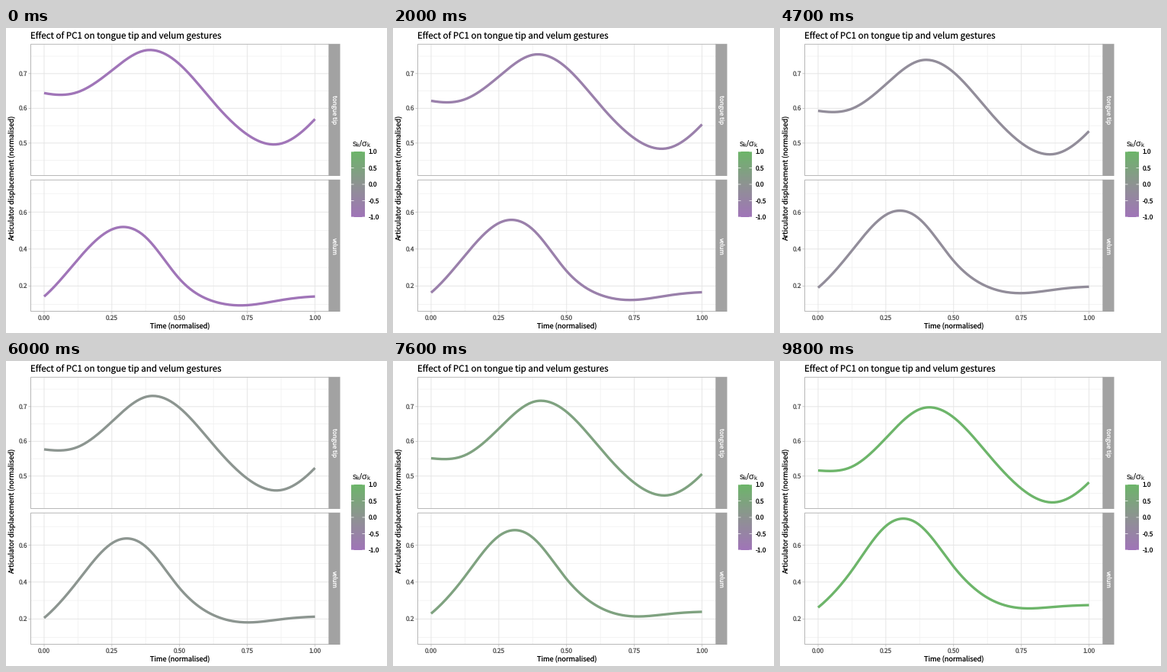
Write a matplotlib script that moves like this. It is 500 px wide and 400 px high and loops after 10 s.

```python
import numpy as np
import matplotlib.pyplot as plt
from matplotlib.animation import FuncAnimation
from matplotlib.patches import Rectangle

W, H, DPI = 500, 400, 100
PT = 72 / DPI  # points per pixel
STEP_MS, LOOP_MS = 100, 10000

plt.rcParams.update({
    "font.family": "Noto Sans CJK JP",
    "mathtext.fontset": "custom",
    "mathtext.rm": "Liberation Sans",
    "text.hinting": "none",
    "text.hinting_factor": 1,
    "path.snap": False,
})

PURPLE, MIDDLE, GREEN = (160, 117, 184), (142, 147, 146), (109, 181, 106)
STRIP, BORDER = "#a2a2a2", "#b8b8b8"
MAJOR, MINOR = "#e6e6e6", "#f1f1f1"
TICK_TEXT = "#4d4d4d"

LEFT, RIGHT, STRIP_RIGHT = 32.5, 424, 438.5
X0, X_SPAN = 50, 355.5
TIME = np.linspace(0, 1, 181)


def spline(knots, start, end):
    """Smooth curve through evenly spaced knots with given end slopes."""
    y = np.array(knots)
    n = len(y) - 1
    system = 4 * np.eye(n + 1) + np.eye(n + 1, k=1) + np.eye(n + 1, k=-1)
    system[0], system[n] = np.eye(n + 1)[[0, n]]
    inner = 3 * (y[2:] - y[:-2])
    slope = np.linalg.solve(system, [start / n, *inner, end / n])

    i = np.minimum((TIME * n).astype(int), n - 1)
    u = TIME * n - i
    rise = y[i + 1] - y[i]
    bend = (slope[i] - rise) * (1 - u) - (slope[i + 1] - rise) * u
    return y[i] + rise * u + u * (1 - u) * bend


def score_colour(score):
    stops = zip(PURPLE, MIDDLE, GREEN)
    return tuple(np.interp(score, [-1, 0, 1], s) / 255 for s in stops)


class Panel:
    """One facet: name, pixel extent, value axis and the curve at both ends."""

    def __init__(self, name, top, bottom, ref, scale, major, minor, low, high):
        self.name, self.top, self.bottom = name, top, bottom
        self.ref, self.scale = ref, scale
        self.major, self.minor = major, minor
        self.low, self.high = low, high

    def y(self, value):
        ref_value, ref_y = self.ref
        return ref_y - (value - ref_value) * self.scale

    def curve(self, score):
        return self.y(self.low + (self.high - self.low) * (score + 1) / 2)


tongue = Panel(
    "tongue tip", 21.3, 193.5, (0.7, 59.8), 455.5,
    np.arange(0.5, 0.71, 0.1), np.arange(0.45, 0.76, 0.1),
    spline([.644, .647, .709, .767, .727, .618, .5245, .4985, .569], -.15, .83),
    spline([.516, .527, .609, .6925, .669, .565, .464, .4245, .482], -.05, .78),
)
velum = Panel(
    "velum", 199.3, 371.5, (0.2, 338.3), 242.2,
    np.arange(0.2, 0.61, 0.2), np.arange(0.1, 0.71, 0.2),
    spline([.143, .344, .506, .464, .238, .117, .096, .1235, .143], 1.25, .06),
    spline([.262, .463, .703, .708, .484, .315, .2585, .266, .275], 1.2, .03),
)
panels = [tongue, velum]

fig = plt.figure(figsize=(W / DPI, H / DPI), dpi=DPI, facecolor="white")
ax = fig.add_axes([0, 0, 1, 1])
ax.axis("off")


def stroke(xs, ys, colour, width, z=1):
    return ax.plot(xs, ys, color=colour, lw=width * PT, zorder=z,
                   solid_capstyle="butt")[0]


def label(x, y, text, size, colour="black", **kw):
    kw.setdefault("va", "baseline")
    ax.text(x, y, text, fontsize=size * PT, color=colour, zorder=6, **kw)


def draw_panel(p):
    def across(value, colour, width):
        stroke([LEFT, RIGHT], [p.y(value)] * 2, colour, width)

    def down(value, colour, width):
        stroke([X0 + value * X_SPAN] * 2, [p.top, p.bottom], colour, width)

    for v in p.minor:
        across(v, MINOR, 0.8)
    for v in np.arange(0.125, 1, 0.25):
        down(v, MINOR, 0.8)
    for v in p.major:
        across(v, MAJOR, 1)
        stroke([LEFT - 3, LEFT], [p.y(v)] * 2, BORDER, 0.8)
        label(28, p.y(v) + 3, f"{v:.1f}", 8.3, TICK_TEXT, ha="right")
    for v in np.arange(0, 1.01, 0.25):
        down(v, MAJOR, 1)
    ax.add_patch(Rectangle((LEFT, p.top), RIGHT - LEFT, p.bottom - p.top,
                           fill=False, ec=BORDER, lw=PT, zorder=4))
    ax.add_patch(Rectangle((RIGHT - 0.5, p.top - 0.5), STRIP_RIGHT - RIGHT + 0.5,
                           p.bottom - p.top + 1, fc=STRIP, lw=0, zorder=5))
    label(430.5, (p.top + p.bottom) / 2, p.name, 7.9, "white",
          ha="center", va="center", rotation=270)


def draw_legend():
    left, right, top, bottom = 453, 471, 162, 248
    ramp = [[score_colour(s)] for s in np.linspace(1, -1, 86)]
    ax.imshow(ramp, extent=(left, right, bottom, top), aspect="auto",
              interpolation="nearest", zorder=2)
    for s in np.linspace(1, -1, 5):
        y = np.interp(s, [-1, 1], [bottom, top])
        stroke([left, left + 3.5], [y] * 2, "white", 0.7, 3)
        stroke([right - 3.5, right], [y] * 2, "white", 0.7, 3)
        label(475.5, y + 3, f"{s:.1f}", 8.3)
    label(453.5, 155.5, r"$\mathrm{s_k/\sigma_k}$", 11.3)


for p in panels:
    draw_panel(p)
for v in np.arange(0, 1.01, 0.25):
    x = X0 + v * X_SPAN
    stroke([x, x], [velum.bottom, velum.bottom + 3], BORDER, 0.8)
    label(x, 383, f"{v:.2f}", 8.3, TICK_TEXT, ha="center")
draw_legend()
label(32, 14, "Effect of PC1 on tongue tip and velum gestures", 11.55)
label(228, 394, "Time (normalised)", 9.2, ha="center")
label(9, 196.5, "Articulator displacement (normalised)", 9.25,
      ha="center", va="center", rotation=90)

lines = [stroke(X0 + TIME * X_SPAN, p.curve(-1), score_colour(-1), 3.3, 3)
         for p in panels]
ax.set_xlim(0, W)
ax.set_ylim(H, 0)


def score_at(ms):
    """Forty equal steps from -1 to 1: slower at first, then quicker."""
    if ms < 200:
        step = 0
    elif ms < 5600:
        step = 1 + (ms - 200) // 300
    else:
        step = 19 + (ms - 5600) // 200
    return -1 + step / 20


def update(frame):
    score = score_at(frame * STEP_MS)
    for line, p in zip(lines, panels):
        line.set_ydata(p.curve(score))
        line.set_color(score_colour(score))
    return lines


anim = FuncAnimation(fig, update, frames=LOOP_MS // STEP_MS, interval=STEP_MS,
                     repeat=True, repeat_delay=0, blit=False)
plt.show()
```
